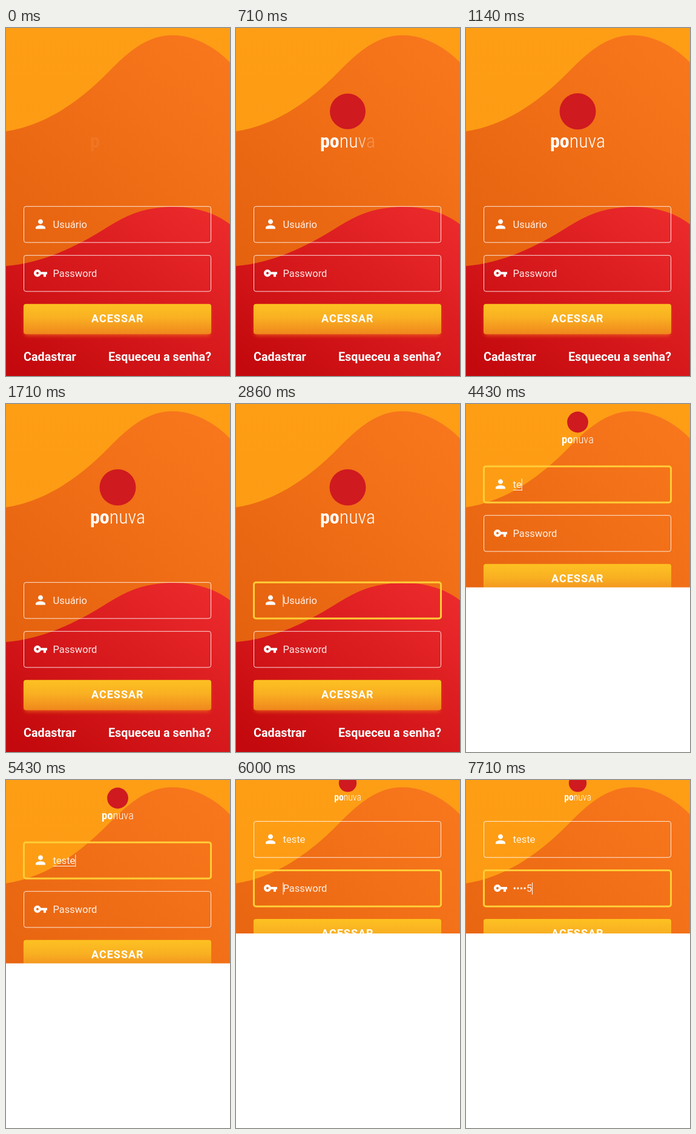
Animation of 370 by 576 pixels, one loop 8 s. Source, as an HTML page:

```html
<!DOCTYPE html>
<html lang="pt">
<head>
<meta charset="utf-8">
<title>Login</title>
<style>
html, body { margin: 0; width: 100%; height: 100%; overflow: hidden; }
svg { display: block; width: 370px; height: 576px; font-family: Roboto, sans-serif; fill: #fff; }
.box { fill: none; stroke: #fff; stroke-opacity: .85; }
.box.focus { stroke: #fecd38; stroke-opacity: 1; stroke-width: 3; }
.value { font-size: 16.5px; white-space: pre; fill-opacity: .9; }
.link { font-size: 19.75px; font-weight: 700; }
.brand { font: 300 32px "Roboto Condensed", Roboto, sans-serif; font-stretch: 75%; text-anchor: middle; }
.bold { font-weight: 700; }
</style>
</head>
<body>
<svg viewBox="0 0 370 576">
  <defs>
    <linearGradient id="sky" x2="0" y2="1"><stop stop-color="#fe9e15"/><stop offset="1" stop-color="#fc9811"/></linearGradient>
    <linearGradient id="orange" x1="1" y1="0" x2=".15" y2="1"><stop stop-color="#f9781d"/><stop offset=".35" stop-color="#f37118"/><stop offset="1" stop-color="#e5620f"/></linearGradient>
    <linearGradient id="red" x1="1" y1="0" x2=".1" y2="1"><stop stop-color="#ee2c2e"/><stop offset="1" stop-color="#c3090d"/></linearGradient>
    <linearGradient id="gold" x2="0" y2="1"><stop stop-color="#fdc122"/><stop offset=".45" stop-color="#f9b022"/><stop offset="1" stop-color="#f0871d"/></linearGradient>
    <filter id="glow" x="-10%" y="-30%" width="120%" height="180%"><feGaussianBlur stdDeviation="3"/></filter>
  </defs>

  <rect width="370" height="576" fill="url(#sky)"/>
  <path fill="url(#orange)" d="M0 171C60 162 115 128 170 72C205 36 235 12 275 12C315 12 350 36 370 57V420H0Z"/>
  <path fill="url(#red)" d="M0 394C60 389 115 363 170 328C205 306 235 296 277 296C318 296 350 309 370 325V576H0Z"/>

  <g id="form">
    <rect class="box" x="29.5" y="295.3" width="309" height="59.7" rx="3.5"/>
    <path transform="translate(45 312.5)" d="M12 12c2.21 0 4-1.79 4-4s-1.79-4-4-4-4 1.79-4 4 1.79 4 4 4zm0 2c-2.67 0-8 1.34-8 4v2h16v-2c0-2.66-5.33-4-8-4z"/>
    <text class="value" x="77.5" y="330.8"></text>

    <rect class="box" x="29.5" y="376.3" width="309" height="59.7" rx="3.5"/>
    <path transform="translate(45 393.7)" d="M12.65 10C11.83 7.67 9.61 6 7 6c-3.31 0-6 2.69-6 6s2.69 6 6 6c2.61 0 4.83-1.67 5.65-4H17v4h4v-4h2v-4H12.65zM7 14c-1.1 0-2-.9-2-2s.9-2 2-2 2 .9 2 2-.9 2-2 2z"/>
    <text class="value" x="77.5" y="411.8"></text>

    <rect id="underline" x="78" y="334" height="1"/>
    <rect id="caret" width="1" height="20"/>

    <rect x="31" y="462" width="306" height="47" rx="4" fill="#f2791d" opacity=".7" filter="url(#glow)"/>
    <rect x="29" y="456.8" width="310" height="50" rx="4" fill="url(#gold)"/>
    <text class="bold" x="141" y="487" font-size="18" letter-spacing="1">ACESSAR</text>
    <text class="link" x="29" y="550.7">Cadastrar</text>
    <text class="link" x="339" y="550.7" text-anchor="end">Esqueceu a senha?</text>
  </g>

  <g id="logo">
    <circle id="mark" fill="#cf1a20"/>
    <text class="brand" y="60"></text>
  </g>

  <rect id="panel" width="370" height="576"/>
</svg>

<script>
const LOOP = 8000;
const $ = id => document.getElementById(id);
const clamp = v => Math.min(1, Math.max(0, v));
const easeOut = v => 1 - (1 - clamp(v)) ** 3;
const boxes = document.querySelectorAll('.box');
const values = document.querySelectorAll('.value');

const brand = document.querySelector('.brand');
const letters = [...'ponuva'].map((char, i) => {
  const span = document.createElementNS('http://www.w3.org/2000/svg', 'tspan');
  span.textContent = char;
  if (i < 2) span.setAttribute('class', 'bold');
  return brand.appendChild(span);
});

// Each view: start time, form offset, logo centre and scale, top of the white panel
const views = [
  [0, 0, 138, 1, 576],
  [3000, -192, 30, .58, 303.5],
  [6000, -226.8, 5, .49, 254],
];
const hints = ['Usuário', 'Password'];
const userKeys = [4140, 4430, 4860, 5140, 5430];
const passKeys = [6570, 6860, 7140, 7430, 7710];

const typed = (keys, t) => keys.filter(k => k <= t).length;
const set = (el, attrs) => {
  for (const name in attrs) el.setAttribute(name, attrs[name]);
};

function draw(t) {
  const [, shift, logoY, scale, panelY] = views.findLast(view => view[0] <= t);
  set($('form'), { transform: `translate(0 ${shift})` });
  set($('logo'), { transform: `translate(184.5 ${logoY}) scale(${scale})` });
  set($('panel'), { y: panelY });

  set($('mark'), { r: 30 * easeOut((t - 280) / 580) });
  letters.forEach((span, i) => set(span, { 'fill-opacity': clamp((t + 20 - i * 130) / 320) }));

  const count = typed(passKeys, t);
  const texts = [
    'teste'.slice(0, typed(userKeys, t)),
    count ? '•'.repeat(count - 1) + count : '',
  ];
  const focus = t < 2860 ? -1 : t < 6000 ? 0 : 1;
  values.forEach((el, i) => {
    el.textContent = texts[i] || hints[i];
    boxes[i].classList.toggle('focus', i === focus);
  });

  const width = texts[focus] ? values[focus].getComputedTextLength() : 0;
  const blinkOff = t >= 3430 && t < 3860;
  set($('caret'), { x: 77.5 + width, y: focus ? 396.5 : 315.5, opacity: focus < 0 || blinkOff ? 0 : 1 });
  set($('underline'), { width: focus === 0 ? width : 0 });
}

function tick() {
  draw(performance.now() % LOOP);
  requestAnimationFrame(tick);
}
tick();
</script>
</body>
</html>
```
